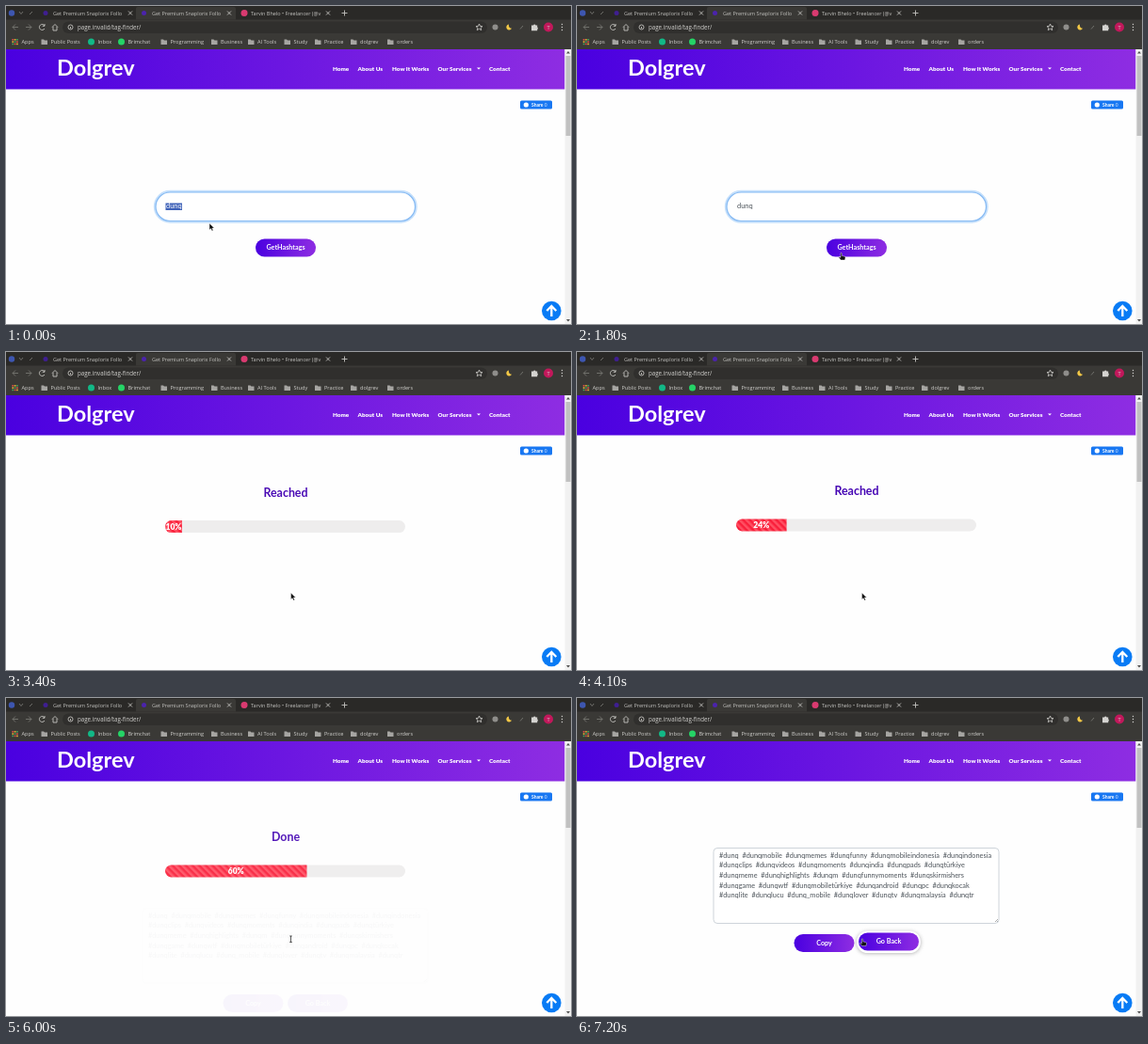
These frames come from a looping animation (600 by 338 pixels, 7300 ms). An HTML page:

```html
<!DOCTYPE html>
<html lang="en">
<head>
<meta charset="utf-8">
<title>Hashtag finder</title>
<style>
  html, body { margin: 0; width: 100%; height: 100%; overflow: hidden; background: #fefefe; }
  svg { display: block; width: 100vw; height: 100vh; }
  text { font-family: Lato, sans-serif; font-size: 7.4px; white-space: pre; }
  .ui text { font-family: "Open Sans", "Noto Sans", sans-serif; font-size: 5.6px; fill: #d2d1ce; }
  .ui .tab { font-size: 5.5px; fill: #c4c3c0; }
  .ui .address { font-size: 6.2px; }
  .icon { fill: none; stroke: #c3c2bf; stroke-width: .9; }
  .dim { stroke: #777672; }
  .brand { font-size: 23.5px; font-weight: 700; fill: #fff; }
  .nav text { font-size: 6.3px; font-weight: 900; fill: #fff; }
  .title { font-size: 12.4px; font-weight: 700; fill: #4606b4; text-anchor: middle; }
  .percent { font-size: 8.5px; font-weight: 900; fill: #fff; text-anchor: middle; }
  .button text { font-size: 7.2px; font-weight: 700; fill: #fff; text-anchor: middle; }
  .tags text { fill: #495057; font-size: 7.35px; }
  .share { font-size: 5px; font-weight: 700; fill: #fff; }
</style>
</head>
<body>
<svg viewBox="0 0 600 338" preserveAspectRatio="none">
  <defs>
    <linearGradient id="violet"><stop stop-color="#4a00e0"/><stop offset="1" stop-color="#8e2de2"/></linearGradient>
    <pattern id="stripes" width="5" height="5" patternUnits="userSpaceOnUse">
      <rect width="5" height="5" fill="#f91f3b"/><rect width="2.5" height="5" fill="#ff5063"/>
    </pattern>
    <clipPath id="track"><rect x="169" y="177.5" width="255" height="13" rx="6.5"/></clipPath>
    <clipPath id="page"><rect y="89" width="593" height="249"/></clipPath>
    <filter id="blur" x="-30%" y="-80%" width="160%" height="260%"><feGaussianBlur stdDeviation="2.2"/></filter>
  </defs>

  <rect width="600" height="338" fill="#fefefe"/>

  <g class="ui">
    <rect width="600" height="46" fill="#3a3936"/>
    <rect width="600" height="14.5" fill="#2a2927"/>
    <path d="M138 14.5V3q0-2 2-2H242q2 0 2 2V14.5z" fill="#3a3936"/>
    <rect x="60" y="16.5" width="451" height="12.5" rx="6.2" fill="#302f2d"/>
    <circle cx="6" cy="7.5" r="3.2" fill="#3d56b0"/>
    <path class="icon dim" d="M14 6l2 2.5 2-2.5M25 9l3-3"/>
    <g id="tabs"></g>
    <path class="icon" d="M356.500 7.500h6M359.500 4.500v6"/>
    <path class="icon" d="M41 21a3 3 0 1 0 0 3M41 19v2.300h-2.300M49 22.500l3-3 3 3M50 22v4h4v-4"/>
    <path class="icon dim" d="M13 22.500H7m3-3l-3 3 3 3M21 22.500h6m-3-3l3 3-3 3"/>
    <circle class="icon" cx="68.500" cy="22.500" r="2.500"/>
    <path class="icon" d="M68.500 22v2"/>
    <text class="address" x="76" y="25">page.invalid/tag-finder/</text>
    <path class="icon" stroke-width=".7" d="M502.500 19l1 2.400 2.500.200-1.900 1.600.600 2.500-2.200-1.400-2.200 1.400.600-2.500-1.900-1.600 2.500-.200z"/>
    <circle cx="519.500" cy="22.500" r="3" fill="#8f8e8b"/>
    <path d="M534 19.500a3 3 0 1 0 3 4.300 3.300 3.300 0 0 1-3-4.300" fill="#f3c846"/>
    <path class="icon dim" d="M546 24.500l3-3.500"/>
    <path d="M558 20.500h2a1.300 1.300 0 0 1 2.500 0h1.700v2a1.300 1.300 0 0 1 0 2.300v1.400H558z" fill="#d4d3d0"/>
    <circle cx="576" cy="22.500" r="5" fill="#c2185b"/>
    <text x="574.500" y="24.500">T</text>
    <path d="M590.500 19.500v6.100" stroke="#d4d3d0" stroke-width="1.400" stroke-linecap="round" stroke-dasharray="0 3"/>
    <g id="bookmarks"></g>
  </g>

  <rect y="46" width="593.500" height="42.500" fill="url(#violet)"/>
  <text class="brand" x="54" y="74">Dolgrev</text>
  <g class="nav">
    <text x="347" y="69">Home</text><text x="373.500" y="69">About Us</text>
    <text x="410" y="69">How It Works</text><text x="458.500" y="69">Our Services</text>
    <text x="513" y="69">Contact</text>
    <path d="M500 65.500h4l-2 2z" fill="#fff"/>
  </g>

  <rect x="546" y="100.500" width="34" height="9" rx="1.500" fill="#1877f2"/>
  <circle cx="552.300" cy="105" r="2.600" fill="#fff"/>
  <text class="share" x="558" y="106.800">Share <tspan fill="#a9cbf8">0</tspan></text>

  <g clip-path="url(#page)">
    <g id="form">
      <rect id="glow" x="158" y="197" width="277.500" height="32.500" rx="16.200" fill="none" stroke="#c4dffb" stroke-width="2.400"/>
      <rect id="field" x="159" y="198" width="275.500" height="30.500" rx="15.200" fill="#fff"/>
      <rect id="selection" x="169.500" y="209.500" width="17.500" height="7.500" fill="#3f62b8"/>
      <text id="query" x="170" y="215.200"></text>
      <g class="button" id="search"></g>
    </g>

    <g id="progress">
      <text class="title" id="status" x="297" y="152"></text>
      <g clip-path="url(#track)">
        <rect x="169" y="177" width="255" height="14" fill="#eeeded"/>
        <rect id="fill" x="169" y="177" height="14" fill="url(#stripes)"/>
      </g>
      <text class="percent" id="percent" y="187"></text>
    </g>

    <g id="result">
      <rect x="145" y="159.500" width="303" height="80" rx="4" fill="#fff" stroke="#ced4da"/>
      <path d="M447 235l-3 3M447 237l-1 1" stroke="#777" stroke-width=".6"/>
      <g class="tags" id="tags"></g>
      <g class="button" id="copy"></g>
      <g class="button" id="back"></g>
    </g>
  </g>

  <circle cx="579.300" cy="324" r="10.300" fill="#087bf5"/>
  <path d="M579.300 330v-11m-5 5l5-5.200 5 5.200" fill="none" stroke="#fff" stroke-width="2.300"/>

  <rect x="593.500" y="46" width="6.500" height="292" fill="#f1f1f1"/>
  <rect x="594.500" y="53" width="5" height="85" fill="#c1c1c1"/>
  <path d="M595 50.500h4l-2-2.500zM595 333h4l-2 2.500z" fill="#505050"/>

  <g id="cursor">
    <path id="arrow" d="M0 0v7l1.600-1.400 1.100 2.500 1.300-.600-1.100-2.400h2.200z" fill="#111" stroke="#fff" stroke-width=".4"/>
    <path id="hand" d="M0 0q1.200-.500 1.300.700V3l3 .700q.900.300.700 1.300L4.500 7.500H.200L-2.200 4.600q.800-.900 2.200.200z" fill="#111" stroke="#fff" stroke-width=".4"/>
    <path id="beam" d="M-1.300-3h2.600M0-3v6.500M-1.300 3.500h2.600" stroke="#333" stroke-width=".8"/>
  </g>
</svg>
<script>
const LOOP = 7300;
const $ = id => document.getElementById(id);
const set = (id, attrs) => { for (const k in attrs) $(id).setAttribute(k, attrs[k]); };
const show = (id, visible) => set(id, { visibility: visible ? "visible" : "hidden" });
const span = (t, start, length) => Math.min(1, Math.max(0, (t - start) / length));
const ease = x => (1 - (1 - x) ** 3) ** 1.5;
const mix = (a, b, x) => a + (b - a) * x;

$("tabs").innerHTML = [
  [42, "Get Premium Snaplorix Follo", "#3f1f91"],
  [146.5, "Get Premium Snaplorix Follo", "#4b23ac"],
  [253, "Tarvin Bhelo • Freelancer (@v", "#d93a70"]
].map(([x, label, color], i) => {
  const close = [132, 237, 342][i];
  return `<circle cx="${x}" cy="7.5" r="${i < 2 ? 2.5 : 3.5}" fill="${color}"/>
    <text class="tab" x="${[50, 155, 260][i]}" y="9.7">${label}</text>
    <path class="icon" d="M${close - 2} 5.500l4 4m0-4l-4 4"/>`;
}).join("");

const appColors = ["#e8504a", "#f2b632", "#49a85d"];
let bar = `<text x="16.500" y="40">Apps</text>`;
for (let i = 0; i < 9; i++)
  bar += `<rect x="${6.5 + i % 3 * 2.3}" y="${35 + Math.floor(i / 3) * 2.3}" width="1.6" height="1.6" fill="${appColors[(i + Math.floor(i / 3)) % 3]}"/>`;
bar += [
  [47.5, "Public Posts"], [97.5, "Inbox", "#12b886"], [129.5, "Brimchat", "#25d366"],
  [174.5, "Programming"], [228, "Business"], [267, "AI Tools"], [305.5, "Study"],
  [338, "Practice"], [376, "dolgrev"], [415, "orders"]
].map(([x, label, color]) => (color
  ? `<circle cx="${x - 7}" cy="38" r="3.5" fill="${color}"/>`
  : `<path d="M${x - 10} 35.500h2.500l1 1h3v4.500h-6.500z" fill="#a6a5a2"/>`)
  + `<text x="${x}" y="40">${label}</text>`).join("");
$("bookmarks").innerHTML = bar;

function makeButton(id, x, y, label) {
  $(id).innerHTML = `<rect class="halo" x="${x - 2}" y="${y - 1}" width="68" height="23" rx="11.5" fill="#777" filter="url(#blur)"/>
    <rect class="halo" x="${x - 2}" y="${y - 2}" width="68" height="23.5" rx="11.5" fill="#fff"/>
    <rect x="${x}" y="${y}" width="64" height="19" rx="9.5" fill="url(#violet)"/>
    <text x="${x + 32}" y="${y + 11.8}">${label}</text>`;
  hover(id, 0);
}

function hover(id, amount) {
  set(id, { transform: `translate(0 ${-1.5 * amount})` });
  $(id).querySelectorAll(".halo").forEach((halo, i) => halo.setAttribute("opacity", amount * (i ? 1 : .6)));
}

makeButton("search", 265, 247.5, "GetHashtags");
makeButton("copy", 230.5, 251, "Copy");
makeButton("back", 299, 251, "Go Back");

$("tags").innerHTML = [
  ",mobile,memes,funny,mobileindonesia,indonesia",
  "clips,videos,moments,india,pads,türkiye",
  "meme,highlights,m,funnymoments,skirmishers",
  "game,wtf,mobiletürkiye,android,pc,kocak",
  "lite,lucu,_mobile,lover,tv,malaysia,tr"
].map((line, i) => `<text x="151" y="${169.8 + i * 10.6}">${
  line.split(",").map(tag => "#dunq" + tag).join("  ")}</text>`).join("");

// A panel rises into place while it fades in, then fades out on the spot.
function panel(id, t, enterAt, leaveAt) {
  const entered = ease(span(t, enterAt, 900));
  const left = ease(span(t, leaveAt, 500));
  set(id, { transform: `translate(0 ${66 * (1 - entered)})`, opacity: entered * (1 - left) });
}

function drawForm(t) {
  const selected = t < 300;
  const focused = t < 2500;
  const typed = [500, 800, 1000, 1200].filter(time => t >= time).length;
  set("form", { opacity: 1 - ease(span(t, 2730, 500)) });
  set("selection", { opacity: selected ? 1 : 0 });
  set("glow", { opacity: focused ? 1 : 0 });
  set("field", { stroke: focused ? "#84b9f3" : "#4335dc", "stroke-width": focused ? 1.2 : 1 });
  $("query").textContent = selected ? "dunq" : "dunq".slice(0, typed);
  set("query", { fill: selected ? "#fff" : focused ? "#495057" : "#5b33d6" });
  hover("search", span(t, 1900, 300));
  set("search", { opacity: mix(1, .75, span(t, 2600, 200)) });
}

function drawProgress(t) {
  panel("progress", t, 2730, 5970);
  const value = t < 5300
    ? Math.max(0, 24 + (t - 4100) * .02)
    : Math.min(100, 48 + (t - 5300) * 12 / 700);
  const width = 2.55 * Math.max(0, value - mix(3, 1, span(t, 5300, 700)));
  set("fill", { width });
  set("percent", { x: 169 + width / 2 });
  $("percent").textContent = Math.floor(value + .001) + "%";
  $("status").textContent = t < 4600 ? "Reached" : t < 5600 ? "Hashtag Fetched" : "Done";
  set("stripes", { patternTransform: `translate(${-t * .007} 0) rotate(-45)` });
}

function drawCursor(t) {
  const first = ease(span(t, 1200, 550));
  const second = ease(span(t, 2000, 500));
  const x = mix(mix(216, 280, first), 302.5, second);
  const y = mix(mix(231, 262.5, first), 256, second);
  const shape = t >= 6750 || (t >= 1600 && t < 2750) ? "hand" : t >= 5970 ? "beam" : "arrow";
  set("cursor", { transform: `translate(${x} ${y})` });
  for (const id of ["arrow", "hand", "beam"]) show(id, id === shape);
}

function render(t) {
  drawForm(t);
  drawProgress(t);
  panel("result", t, 5970, LOOP);
  hover("back", span(t, 6750, 300));
  drawCursor(t);
}

function frame() {
  render(performance.now() % LOOP);
  requestAnimationFrame(frame);
}
frame();
</script>
</body>
</html>
```
